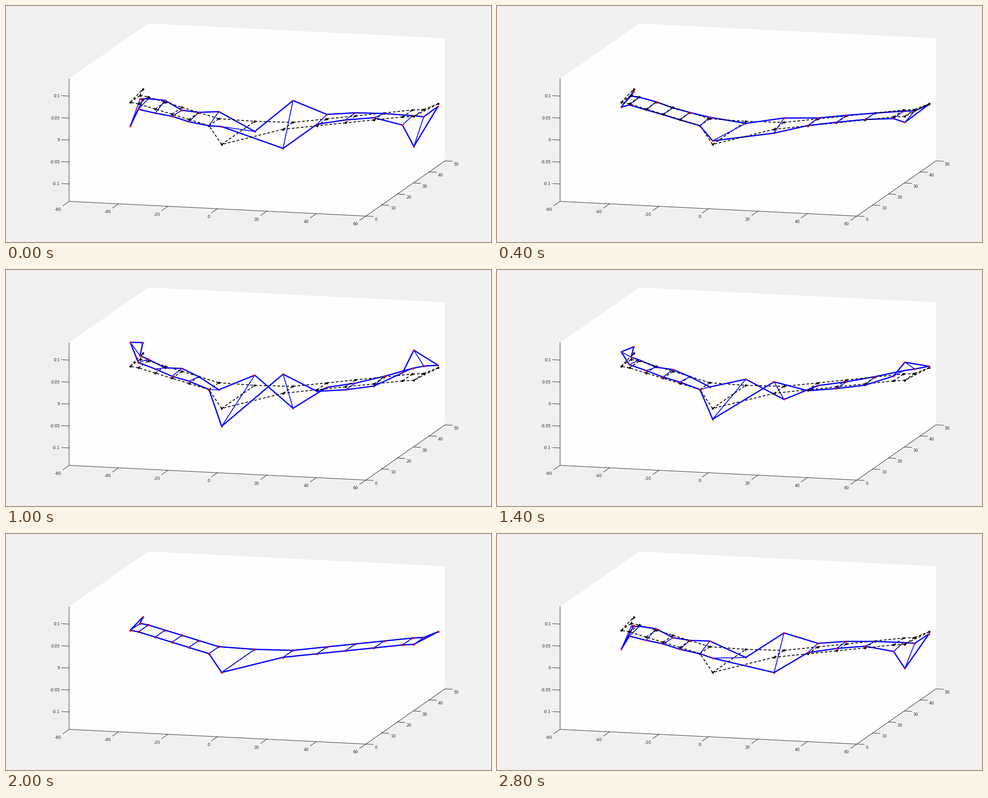
A matplotlib script for the animation above (3000 ms loop, 1073 by 522 pixels).

```python
import matplotlib.pyplot as plt
import numpy as np
from matplotlib.animation import FuncAnimation
from matplotlib.collections import LineCollection

W, H, DPI = 1073, 522, 100
PX = 72 / DPI  # points per pixel
INK = "#262626"
FLOOR = 0.1396
plt.rcParams["font.family"] = "DejaVu Sans"

# Fast unloading, then a steady return
LOADS = list(range(5, -5, -2)) + list(range(-5, 5))


def project(x, y, z=0.0):
    """Axonometric view: data coordinates to stage pixels."""
    return np.stack(np.broadcast_arrays(
        467.8 + 5.471 * x + 3.5 * y,
        312.7 + 0.271 * x - 2.44 * y - 972 * z), axis=-1)


def heave(x):
    """Downward shift in pixels of a section per unit of load."""
    r = np.abs(x)
    root = -1.7 * np.exp(-(r / 22) ** 2)
    tip = 7.2 * (r / 57.35) ** 16
    sway = -1.25 * np.sign(x) * np.cos(2 * np.pi * (r - 33) / 58)
    return root + tip + sway


# Swept wing, symmetric about x = 0, cut into sections
half = np.r_[15, 25.9 + 9.17 * np.arange(4), 57.35]
span = np.r_[-half[::-1], 0, half]
lead = np.interp(np.abs(span), [0, 15, 53.4, 57.35], [2.65, 18.05, 33.5, 34.5])
chord = np.where(span == 0, 20.95, 6.27)
twist = np.array([9, 1.6, 2.6, -0.4, 1.1, 3.2, -12.4,
                  18.1, 1.3, 0.1, -1.2, 1.1, 10.1])

# Nodes: leading edge, trailing edge, then the two wing tips
REST = np.vstack([project(span, lead), project(span, lead + chord),
                  project(np.array([-59.7, 59.7]), 46.1)])
SHIFT = np.r_[heave(span) + twist / 2, heave(span) - twist / 2, 4.7, 1.15]

n = len(span)
front, back = np.arange(n), np.arange(n, 2 * n)
loop = np.r_[2 * n, back, 2 * n + 1, front[::-1]]
outline = np.column_stack([loop, np.roll(loop, -1)])
ribs = np.column_stack([front, back])
EDGES = np.vstack([outline, ribs])
WIDTHS = np.repeat([2.8, 1.8], [len(outline), len(ribs)]) * PX

fig = plt.figure(figsize=(W / DPI, H / DPI), dpi=DPI, facecolor="#f0f0f0")
ax = fig.add_axes([0, 0, 1, 1])
ax.set_xlim(0, W)
ax.set_ylim(H, 0)
ax.axis("off")


def stroke(points):
    ax.plot(*np.transpose(points), color=INK, lw=PX, snap=False, zorder=1)


def tick(p, step, text, offset, ha):
    stroke([p, p + step])
    x, y = p + offset
    ax.text(x, y, text, ha=ha, va="center_baseline", size=8.9 * PX, color=INK)


def draw_box():
    left, near, right = (project(x, y, -FLOOR)
                         for x, y in ((-60, 0), (60, 0), (60, 50)))
    top, far, corner = (project(x, y, FLOOR)
                        for x, y in ((-60, 0), (-60, 50), (60, 50)))
    ax.fill(*np.transpose([top, far, corner, right, near, left]),
            color="#fefefe", lw=0, zorder=0)
    stroke([top, left, near, right])
    for x in range(-60, 61, 20):
        tick(project(x, 0, -FLOOR), (-13.5, 9.4), str(x), (-17.2, 17.2), "right")
    for y in range(0, 51, 10):
        tick(project(60, y, -FLOOR), (16.5, 0.8), str(y), (19.6, 6.6), "left")
    for z in np.arange(-2, 3) * 0.05:
        tick(project(-60, 0, z), (-16.5, -0.8), f"{z:g}", (-20.5, -0.8), "right")


def draw_rest_shape():
    for edge in EDGES:
        ax.plot(*REST[edge].T, color="black", lw=1.85 * PX,
                ls=(0, (3.2, 2.2)), dash_capstyle="butt", zorder=4)
    ax.plot(*REST.T, "o", color="black", ms=4.9 * PX, mew=0, zorder=4.5)


def add_layer(z):
    lines = LineCollection([], colors="blue", capstyle="round", zorder=z)
    ax.add_collection(lines, autolim=False)
    dots, = ax.plot([], [], "o", color="red", ms=4 * PX, mew=0, zorder=z + 0.2)
    return lines, dots


draw_box()
draw_rest_shape()
below, above = add_layer(2), add_layer(6)


def update(i):
    offset = LOADS[i] * SHIFT
    pos = REST + np.outer(offset, [0, 1])
    # Parts lying lower than the rest shape are farther from the viewer
    far_edge = offset[EDGES].sum(axis=1) > 0
    far_dot = offset > 0
    for (lines, dots), edges, nodes in ((below, far_edge, far_dot),
                                        (above, ~far_edge, ~far_dot)):
        lines.set_segments(pos[EDGES[edges]])
        lines.set_linewidths(WIDTHS[edges])
        dots.set_data(*pos[nodes].T)
    return [*below, *above]


anim = FuncAnimation(fig, update, frames=len(LOADS), interval=200,
                     repeat=True, repeat_delay=0, blit=False)
plt.show()
```
